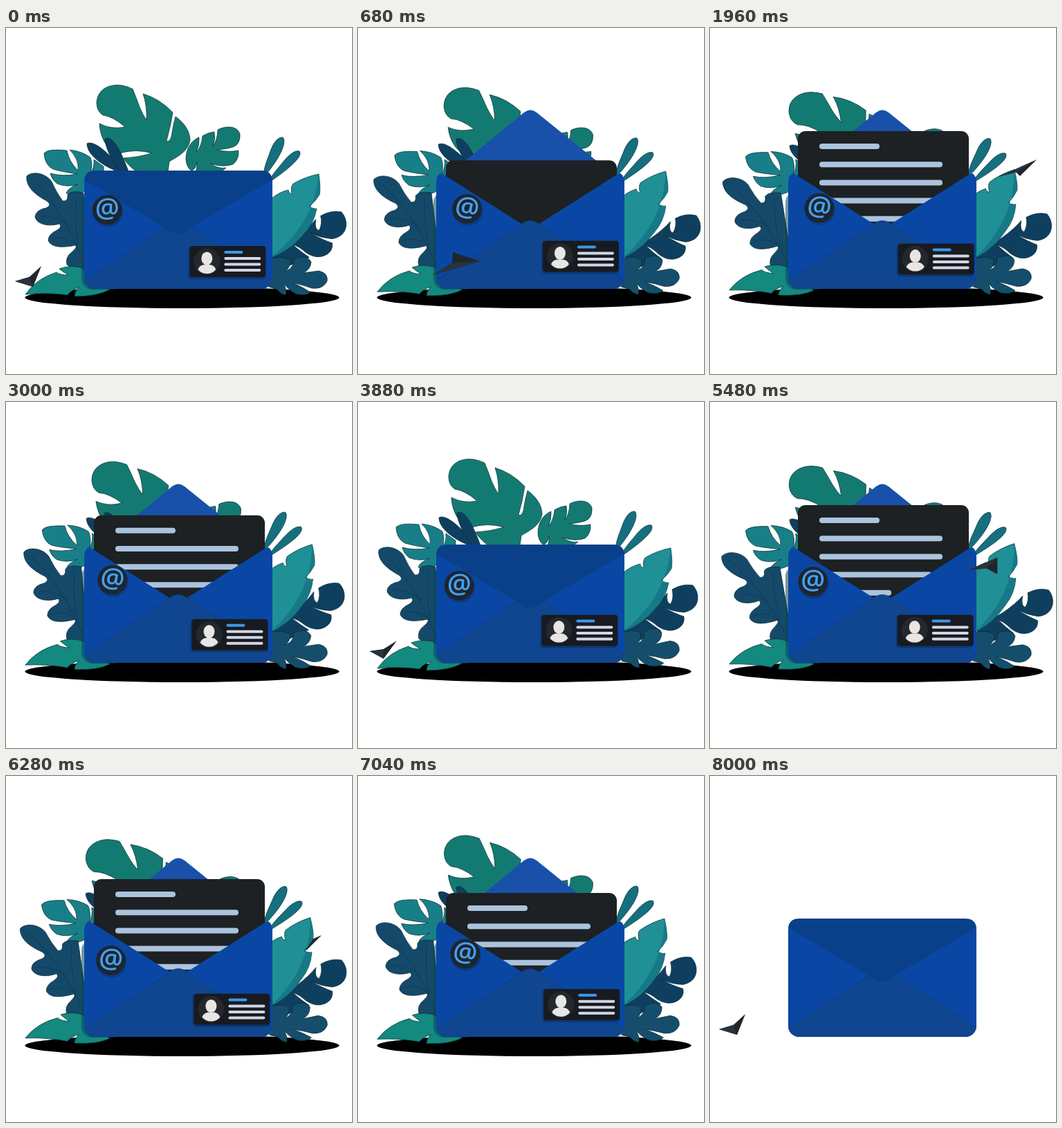
Animation of 500x500 px, one loop 8040 ms. Source, as an HTML page:

```html
<!DOCTYPE html>
<html lang="en">
<head>
<meta charset="utf-8">
<title>Envelope</title>
<style>
html, body { margin: 0; width: 100%; height: 100%; overflow: hidden; background: #fff; }
svg { display: block; width: 100vw; height: 100vh; }
.leaf { stroke: #06292f; stroke-width: .7; }
.vein { fill: none; stroke: #0d3c5a; stroke-width: 1; }
.at { font: 600 39px "Open Sans", sans-serif; text-anchor: middle; fill: #45a0f2; }
</style>
</head>
<body>
<svg viewBox="0 0 500 500" xmlns="http://www.w3.org/2000/svg">
  <defs>
    <clipPath id="body"><rect x="113" y="206" width="272" height="171" rx="16"/></clipPath>
  </defs>

  <ellipse class="extra" cx="254.5" cy="389.5" rx="227" ry="15.5"/>
  <g id="planeBack"></g>

  <g class="extra">
    <g id="top">
      <path class="leaf" fill="#137a72" d="M131 108C132 88 150 80 168 83Q177 85 183 88Q188 100 193 114Q198 126 203 133Q204 112 198 95Q222 102 241 122Q238 142 232 163Q236 166 239 157Q241 142 245 128C258 137 266 150 266 162C263 180 245 187 236 193L233 214H198Q176 200 170 188Q190 187 211 181Q188 174 164 181C146 178 136 158 135 138Q152 147 172 143Q155 128 140 126Q131 120 131 108Z"/>
    </g>
    <g id="smallRight">
      <path class="leaf" fill="#137a72" d="M260 190C260 173 268 163 279 158Q280 168 275 180Q283 170 284 156Q292 151 301 150Q303 160 299 171Q306 160 306 147C318 141 334 141 338 153Q339 168 328 172Q318 175 305 176Q320 180 336 177Q337 190 328 197Q314 202 296 196Q307 204 318 202L300 216H270Q277 204 276 194Q274 205 268 206Q261 202 260 190Z"/>
    </g>
    <g id="tealLeft">
      <path class="leaf" fill="#187f88" d="M55 181Q61 174 88 177Q91 193 104 206Q106 190 92 176Q110 178 122 187Q126 198 122 211Q128 202 127 190L141 200V230L118 234Q100 242 87 239Q89 231 104 226Q88 231 74 225Q66 219 64 210Q82 215 103 211Q82 208 68 204Q56 198 55 181Z"/>
    </g>
    <g id="fingersLeft" fill="#0f3f60">
      <path class="leaf" d="M117 167C126 162 146 177 170 207H160C136 197 117 182 117 167Z"/>
      <path class="leaf" d="M143 160C153 155 164 172 177 207H165C153 192 143 172 143 160Z"/>
    </g>
    <g id="fingersRight" fill="#156f7e">
      <path class="leaf" d="M400 158C406 164 398 186 373 215C371 204 378 190 382 178C386 166 393 157 400 158Z"/>
      <path class="leaf" d="M424 178C430 186 408 204 379 224C384 212 392 204 400 194C408 184 417 176 424 178Z"/>
    </g>
    <g id="darkRight">
      <path class="leaf" fill="#0f3f5f" d="M491 285C490 295 483 302 471 304Q455 303 440 296Q458 306 471 310Q473 322 461 328Q448 334 433 324Q423 315 414 313Q426 323 438 331L388 352L384 326L420 302Q438 288 447 276Q445 291 452 292Q457 282 454 271Q469 262 484 265Q492 274 491 285Z"/>
    </g>
    <g id="lowRight">
      <path class="leaf" fill="#154e6c" d="M380 334Q400 328 411 336Q411 346 404 351Q416 347 416 334Q434 326 441 338Q440 350 429 354Q444 352 452 351Q466 354 464 366Q458 378 442 376Q428 371 414 368Q430 375 440 382Q432 388 418 384Q408 378 402 370Q406 380 404 386Q397 385 392 378L380 374Z"/>
    </g>
    <g id="tealRight">
      <path class="leaf" fill="#1f9096" d="M452 211Q455 232 453 241Q447 251 438 258Q446 262 449 261Q445 283 430 298Q410 322 382 332V248Q394 237 408 234Q408 238 413 240Q411 229 415 225Q432 215 452 211Z"/>
      <path fill="#177987" d="M452 211Q455 232 453 241Q447 251 438 258Q446 262 449 261Q445 283 430 298Q410 322 382 332Q445 284 452 211Z"/>
    </g>
    <g id="oak">
      <path class="leaf" fill="#15496a" d="M30 214C39 206 58 210 66 222Q73 238 82 250Q90 251 89 241Q95 234 112 238L120 356Q100 352 88 342Q85 331 96 323Q104 316 100 314C86 317 66 319 61 307Q61 298 74 292Q82 287 77 283C64 287 45 285 42 273Q43 263 58 260Q67 256 59 250C42 241 28 229 30 214Z"/>
      <path class="vein" d="M40 220Q88 270 114 345M104 312Q98 280 102 245M92 286Q70 270 50 272M104 314Q84 298 66 305"/>
    </g>
    <g id="lowLeft">
      <path class="leaf" fill="#13897f" d="M28 385Q44 362 73 353Q78 357 90 357Q80 351 77 348Q92 342 108 346L150 378Q132 388 99 388Q99 381 105 375Q94 379 89 386Q60 382 28 385Z"/>
    </g>
    <rect x="109" y="236" width="60" height="142" rx="16" fill="#0a4650" opacity=".55"/>
  </g>

  <g id="flapOpen"><path fill="#1950aa" d="M133 210L240 122Q249 115 258 122L367 210Z"/></g>
  <rect x="114" y="212" width="270" height="160" rx="16" fill="#0a3f8a"/>
  <g id="letter">
    <rect x="127" width="247" height="145" rx="11" fill="#1d2123"/>
    <g id="lines" stroke="#abc3dd" stroke-width="8" stroke-linecap="round"></g>
  </g>
  <g clip-path="url(#body)">
    <path fill="#0a47a5" d="M113 222Q113 206 124 212L249 291L374 212Q385 206 385 222V377H113Z"/>
    <path fill="#0a3d8c" d="M113 364L239 281Q249 275 259 281L385 364V377H113Z"/>
    <path fill="#10458f" d="M113 365L239 282Q249 276 259 282L385 365V377H113Z"/>
  </g>
  <g id="flapShut"><path fill="#0a3f8a" d="M113 219Q115 206 129 206H369Q383 206 385 219L256 295Q248 300 240 295Z"/></g>

  <g id="badge" class="extra">
    <circle cx="1" cy="3" r="22" fill="#052a66" opacity=".35"/>
    <circle r="21.5" fill="#1e262e"/>
    <text id="at" class="at" y="11">@</text>
  </g>
  <g id="card" class="extra">
    <rect x="-2" y="1" width="112" height="47" rx="5" fill="#04204e" opacity=".35"/>
    <rect width="110" height="45" rx="4" fill="#171b20"/>
    <circle cx="25" cy="22.5" r="19" fill="#24282c"/>
    <ellipse cx="25" cy="18" rx="8" ry="9.5" fill="#e8e6e4"/>
    <path fill="#e8e6e4" d="M12 34Q14 28 21 27H29Q36 28 38 34Q33 40 25 40Q17 40 12 34Z"/>
    <g stroke-width="4" stroke-linecap="round" stroke="#d2d6e4">
      <path stroke="#3f97ea" d="M52 9H75"/>
      <path d="M52 18H101M52 26.500H101M52 35H101"/>
    </g>
  </g>
  <g id="planeFront"></g>
</svg>
<script>
const LOOP = 8040, CYCLE = 4000, EXTRAS_END = 8000, PLANE_BEHIND = 2150;
const $ = id => document.getElementById(id);
const add = (parent, tag) =>
  parent.appendChild(document.createElementNS("http://www.w3.org/2000/svg", tag));
const place = (id, value) => $(id).setAttribute("transform", value);
const show = (el, on) => el.setAttribute("visibility", on ? "visible" : "hidden");

const ease = (t, from, to) => {
  const u = Math.min(1, Math.max(0, (t - from) / (to - from)));
  return u * u * (3 - 2 * u);
};
// Rises from 0 to 1, holds, and falls back.
const pulse = (t, rise, full, fall, end) => ease(t, rise, full) - ease(t, fall, end);
// Cosine with a whole number of turns in 8 s; peak is a fraction of one turn.
const wave = (time, turns, peak = 0) => Math.cos(2 * Math.PI * (turns * time / 8000 - peak));

const turnLeaf = (id, degrees, x, y) => place(id, `rotate(${degrees} ${x} ${y})`);

function drawLeaves(time, t) {
  const early = pulse(t, 0, 1600, 1950, 3800);
  const late = pulse(t, 0, 1200, 2600, 3950);
  turnLeaf("top", -9.6 * early, 215, 215);
  turnLeaf("smallRight", 4 * early, 285, 210);
  turnLeaf("fingersLeft", -3 * early, 175, 207);
  turnLeaf("tealLeft", -4 * late, 125, 235);
  turnLeaf("fingersRight", 4 * late, 378, 225);
  turnLeaf("tealRight", -6 * late, 385, 325);
  turnLeaf("lowLeft", 3.5 * late, 130, 380);
  turnLeaf("oak", -6 * pulse(t, 0, 1300, 1350, 3950), 112, 345);
  turnLeaf("darkRight", 1.2 + 3 * wave(time, 2, .29), 385, 350);
  turnLeaf("lowRight", -2.5 + 2.5 * wave(time, 3), 385, 360);
}

function flip(id, size, y) {
  show($(id), size > 0);
  place(id, `translate(0 ${y}) scale(1 ${Math.max(size, .001)}) translate(0 ${-y})`);
}

const lines = Array.from({ length: 5 }, () => add($("lines"), "path"));

function drawEnvelope(t) {
  const open = 2 * pulse(t, 0, 420, 3440, 3840) - 1;
  flip("flapShut", -open, 206);
  flip("flapOpen", open, 210);
  place("letter", `translate(0 ${212 - 63 * pulse(t, 420, 1100, 2800, 3440)})`);
  lines.forEach((line, i) => {
    const start = 700 + 130 * i, grown = ease(t, start, start + 480);
    show(line, grown > 0);
    line.setAttribute("d", `M162 ${22 + 26.2 * i}h${(i ? 170 : 79) * grown}`);
  });
}

function drawTokens(time) {
  place("badge", `translate(${152 + 6 * wave(time, 6, .45)} ${262 - 5 * wave(time, 6, .28)})`);
  place("at", `rotate(${5 + 5 * wave(time, 6, .45)})`);
  place("card", `translate(${268.5 - 3.2 * wave(time, 2)} ${311 + 4 * wave(time, 5)})`);
}

// Flight path: time, then the corners nose, tail and wing.
const flight = [
  [0, 39, 374, 13, 366, 51, 344],
  [680, 176, 337, 108, 357, 137, 324],
  [1480, 415, 225, 373, 243, 415, 249],
  [1960, 472, 190, 417, 215, 448, 214],
  [2600, 440, 270, 390, 290, 420, 290],
  [3880, 37, 371, 17, 360, 56, 345],
];

function planeCorners(t) {
  const n = flight.length, i = flight.findLastIndex(key => key[0] <= t);
  const [a, b, c, d] = [-1, 0, 1, 2].map(k => flight[(i + k + n) % n]);
  const u = (t - b[0]) / ((c[0] || CYCLE) - b[0]);
  // Catmull-Rom
  return b.slice(1).map((q, k) => {
    const p = a[k + 1], r = c[k + 1], s = d[k + 1];
    const bend = i < 3 ? 1 : 0;
    const smooth = q + u / 2 * (r - p + u * (2 * p - 5 * q + 4 * r - s + u * (3 * (q - r) + s - p)));
    return bend ? smooth : q + (r - q) * u;
  });
}

const planes = ["planeBack", "planeFront"].map(id => {
  const outline = add($(id), "polygon"), shade = add($(id), "polygon");
  outline.setAttribute("fill", "#20262b");
  shade.setAttribute("fill", "#2a323c");
  return { group: $(id), outline, shade };
});

function drawPlane(t) {
  const [nx, ny, tx, ty, wx, wy] = planeCorners(t);
  const fold = [.25 * nx + .375 * (tx + wx), .25 * ny + .375 * (ty + wy)];
  planes.forEach(({ group, outline, shade }, front) => {
    outline.setAttribute("points", [nx, ny, tx, ty, ...fold, wx, wy]);
    shade.setAttribute("points", [nx, ny, tx, ty, ...fold]);
    show(group, (t <= PLANE_BEHIND) === Boolean(front));
  });
}

const extras = document.querySelectorAll(".extra");

function draw(time) {
  const t = time % CYCLE;
  extras.forEach(el => show(el, time < EXTRAS_END));
  drawLeaves(time, t);
  drawEnvelope(t);
  drawTokens(time);
  drawPlane(t);
}

const begin = performance.now();
function tick() {
  draw((performance.now() - begin) % LOOP);
  requestAnimationFrame(tick);
}
draw(0);
requestAnimationFrame(tick);
</script>
</body>
</html>
```
